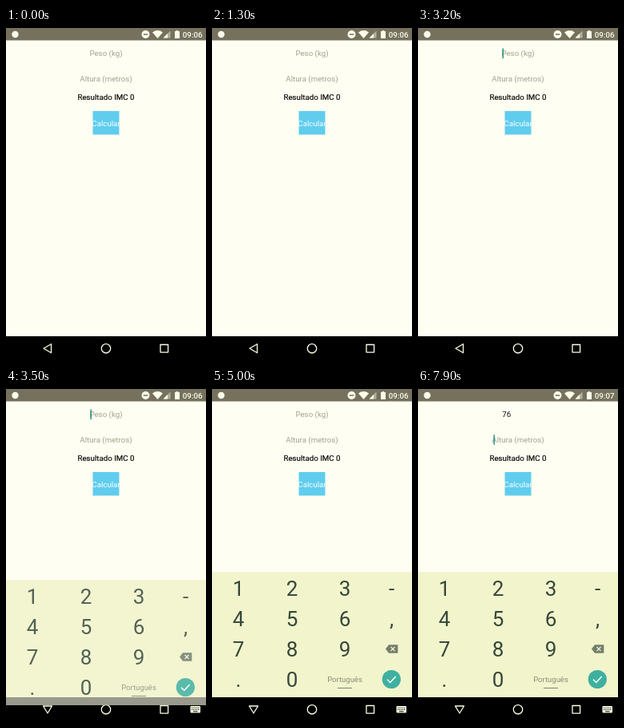
These frames come from a looping animation (250 px wide and 417 px high, 8000 ms). An HTML page:

```html
<!DOCTYPE html>
<html lang="pt">
<head>
<meta charset="utf-8">
<title>IMC</title>
<style>
html, body { margin: 0; width: 100%; height: 100%; overflow: hidden; background: #fefef2; }
svg { display: block; width: 100%; height: 100%; }
text { font: 9.72px Roboto, sans-serif; }
.mid { text-anchor: middle; }
.hint { fill: #a3a38d; }
.key { font-size: 26px; fill: #35473b; text-anchor: middle; }
.line { fill: none; stroke: #fdfde4; stroke-width: 1.3; stroke-linejoin: round; }
.light { fill: #fdfdec; }
</style>
</head>
<body>
<svg viewBox="0 0 250 417">
  <rect width="250" height="417" fill="#fefef2"/>

  <rect width="250" height="15.5" fill="#75715d"/>
  <g class="light">
    <circle cx="11.5" cy="8" r="4.2"/>
    <circle cx="174.5" cy="8" r="5"/>
    <path d="M183 5.4Q189.500 .8 196 5.400L189.500 13Z"/>
    <path d="M205.500 3.500V12.500H196.500Z" opacity=".45"/>
    <path d="M202 7V12.500H196.500Z"/>
    <path d="M211 4h1.800v-1h2.400v1H217v9h-6Z"/>
    <text id="clock" x="245.500" y="11.800" text-anchor="end" style="font-weight:500"></text>
  </g>
  <path d="M171.800 8h5.400" stroke="#75715d" stroke-width="1.500"/>

  <text id="weightHint" class="mid hint" x="125" y="35.300">Peso (kg)</text>
  <text id="weight" x="105.200" y="35.300" fill="#111"></text>
  <text class="mid hint" x="125" y="67.300">Altura (metros)</text>
  <text class="mid" x="125" y="89.500" fill="#000" stroke="#000" stroke-width=".15">Resultado IMC 0</text>
  <rect x="108.500" y="104" width="33" height="29.500" fill="#60cdee"/>
  <text class="mid" x="125" y="122.500" fill="#fff">Calcular</text>
  <rect id="caret" width="1.400" height="12.500" fill="#218c7b"/>

  <rect y="386" width="250" height="31" fill="#000"/>
  <g class="line">
    <path id="back"/>
    <circle cx="125" cy="401.300" r="5.700"/>
    <rect x="193" y="396.500" width="9.600" height="9.600"/>
  </g>
  <g id="keyboard">
    <rect id="panel" y="229" width="250" height="157" fill="#f2f4cc"/>
    <rect id="tail" y="386" width="250" height="0" fill="#b4b4a5"/>
    <g id="keys"></g>
    <text class="mid" x="166" y="366.500" fill="#858e78" style="font-size:9.5px">Português</text>
    <path d="M157 374.500h18" stroke="#7c8574"/>
    <path d="M217 325.500L221 320.300H232.300V330.700H221Z" fill="#747e6d"/>
    <path d="M223.500 323l5 5m0-5l-5 5" stroke="#f2f4cc" stroke-width="1.200"/>
    <circle cx="224.300" cy="363.500" r="11.600" fill="#3fb09f"/>
    <path d="M219 363.800l3.700 3.700 7-7.400" fill="none" stroke="#fff" stroke-width="1.500"/>
  </g>
  <g id="switcher">
    <rect x="230.500" y="397" width="12.500" height="8.500" rx="1" fill="#fdfde4"/>
    <path d="M232 399.300h10M232 401.500h10" stroke="#111" stroke-width="1.100" stroke-dasharray="1.200 .8"/>
    <path d="M234 403.800h5.500" stroke="#111"/>
  </g>
</svg>
<script>
const $ = id => document.getElementById(id);
const LOOP = 8000;

const columns = [33, 100, 166, 224.500];
["123-", "456,", "789", ".0"].forEach((row, r) => {
  [...row].forEach((label, c) => {
    const key = document.createElementNS("http://www.w3.org/2000/svg", "text");
    key.setAttribute("class", "key");
    key.setAttribute("x", columns[c]);
    key.setAttribute("y", 258.500 + r * 38);
    key.textContent = label;
    $("keys").append(key);
  });
});

// [start, value] steps: the latest started one applies
const typed = [[0, ""], [5600, "7"], [6100, "76"]];
const clock = [[0, "09:06"], [6100, "09:07"]];
const slide = [[0, null], [3500, 10], [3600, 3], [3700, 0]];
const carets = [
  [0, null], [2100, [105.500, 25.500]], [2600, null], [3200, [105.500, 25.500]],
  [3700, null], [4200, [105.500, 25.500]], [4700, null], [5300, [105.500, 25.500]],
  [5600, [110.800, 25.500]], [6100, [116, 25.500]], [6600, null],
  [7100, [116, 25.500]], [7600, null], [7700, [94.500, 57.300]]
];
const at = (steps, t) => steps.findLast(([start]) => t >= start)[1];
const show = (el, on) => { el.style.display = on ? "" : "none"; };

function render(t) {
  const value = at(typed, t), caret = at(carets, t), offset = at(slide, t);
  const open = offset !== null;
  $("clock").textContent = at(clock, t);
  $("weight").textContent = value;
  show($("weightHint"), !value);
  show($("caret"), caret);
  if (caret) {
    $("caret").setAttribute("x", caret[0]);
    $("caret").setAttribute("y", caret[1]);
  }
  show($("keyboard"), open);
  show($("switcher"), open);
  $("back").setAttribute("d", open ? "M46.500 397H57.500L52 406Z" : "M56.500 395.800V406.800L47 401.300Z");
  if (open) {
    $("keyboard").setAttribute("transform", `translate(0 ${offset})`);
    $("keyboard").setAttribute("opacity", 1 - offset * .015);
    $("panel").setAttribute("height", 157 - offset);
    $("tail").setAttribute("y", 386 - offset);
    $("tail").setAttribute("height", offset);
  }
}

const origin = performance.now();
function tick() {
  render((performance.now() - origin) % LOOP);
  requestAnimationFrame(tick);
}
tick();
</script>
</body>
</html>
```
